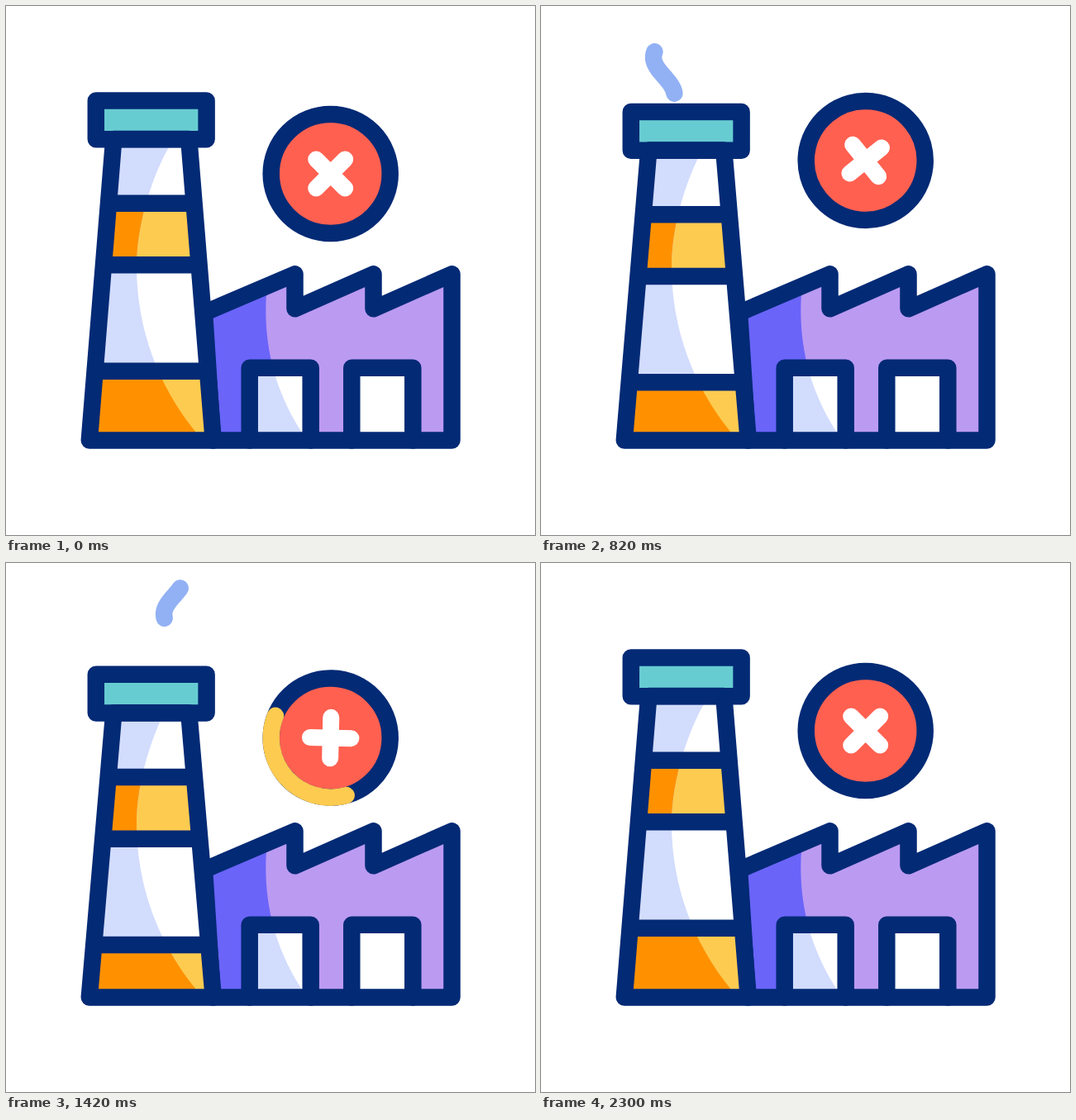
An HTML page for the animation above (2400 ms loop, 640x640 px).

```html
<!DOCTYPE html>
<html lang="en">
<head>
<meta charset="utf-8">
<title>Factory</title>
<style>
  html, body { margin: 0; width: 100%; height: 100%; overflow: hidden; background: #fff; }
  svg { display: block; width: 100vw; height: 100vh; }
  .line { fill: none; stroke: #032a75; stroke-width: 20.5; stroke-linecap: round; stroke-linejoin: round; }
  .smoke { fill: none; stroke: #92b1f4; stroke-width: 20.5; stroke-linecap: round; stroke-linejoin: round; }
</style>
</head>
<body>
<svg viewBox="0 0 640 640">
  <defs>
    <clipPath id="towerClip"><path id="towerShape"/></clipPath>
    <clipPath id="shadeClip">
      <path d="M80 130H219L197 171C180 200 158 260 158 315C158 395 188 465 230 516L238 526H80Z"/>
    </clipPath>
    <clipPath id="hallShade">
      <path d="M230 320H317L315 348C311 410 325 465 358 516L364 526H230Z"/>
    </clipPath>
    <path id="hall" d="M240 371.2L349.5 324.3V366.3L444.5 324.3V366.3L539.5 324.3V525.5H250Z"/>
    <path id="door" d="M294.7 525.5V437.7H368.7V525.5"/>
  </defs>

  <path class="smoke"/>
  <path class="smoke"/>

  <use href="#hall" fill="#bb9af2"/>
  <use href="#hall" fill="#6a64f9" clip-path="url(#hallShade)"/>
  <use href="#door" fill="#fff"/>
  <use href="#door" fill="#d2dcfd" clip-path="url(#hallShade)"/>
  <use href="#door" x="123.6" fill="#fff"/>
  <use href="#hall" class="line"/>
  <use href="#door" class="line"/>
  <use href="#door" x="123.6" class="line"/>

  <g clip-path="url(#towerClip)">
    <g class="lift">
      <path fill="#fff" d="M80 150H270V450H80Z"/>
      <path fill="#fdcb50" d="M80 238.7H270V313.3H80ZM80 441.7H270V540H80Z"/>
    </g>
    <g clip-path="url(#shadeClip)">
      <g class="lift">
        <path fill="#d2dcfd" d="M80 150H270V450H80Z"/>
        <path fill="#ff9100" d="M80 238.7H270V313.3H80ZM80 441.7H270V540H80Z"/>
      </g>
    </g>
  </g>
  <g class="lift">
    <rect class="line" x="108.8" y="114.4" width="133.8" height="46.8" style="fill:#67ccd1"/>
  </g>
  <path id="towerLines" class="line"/>

  <g id="badge">
    <circle class="line" r="72" style="fill:#ff6050"/>
    <path id="arc" fill="none" stroke="#fdcb50" stroke-width="20.5" stroke-linecap="round"/>
    <path d="M-17.5 -17.5L17.5 17.5M17.5 -17.5L-17.5 17.5" stroke="#fff" stroke-width="20" stroke-linecap="round"/>
  </g>
</svg>
<script>
const LOOP = 2400;
const $ = id => document.getElementById(id);
const lifts = document.querySelectorAll('.lift');
const puffs = document.querySelectorAll('.smoke');

// Monotone cubic curve through [time, value] keys; extremes are flat.
function curve(keys) {
  const slope = keys.slice(1).map(([t, v], i) => (v - keys[i][1]) / (t - keys[i][0]));
  const tan = keys.map((_, i) => {
    const a = slope[i - 1] || 0, b = slope[i] || 0;
    return a * b > 0 ? 2 * a * b / (a + b) : 0;
  });
  return t => {
    const i = keys.findIndex(k => t < k[0]) - 1;
    if (i < 0) return keys[keys.length - 1][1];
    const [t0, v0] = keys[i], [t1, v1] = keys[i + 1];
    const d = t1 - t0, u = (t - t0) / d, w = 1 - u;
    return v0 * w * w * (1 + 2 * u) + v1 * u * u * (3 - 2 * u)
      + d * u * w * (tan[i] * w - tan[i + 1] * u);
  };
}

const sink = curve([[0, 0], [340, 47], [820, 13.6], [1620, 21.6], [1960, 0]]);
const bob = curve([[0, 0], [340, 53], [820, -16], [1240, 16.5], [1620, -0.5], [1980, 5.7], [2240, 0]]);
const spin = curve([[0, 0], [340, 48], [820, 185.8], [1240, 388.5], [1620, 614.3], [1980, 782], [2200, 810]]);

const clamp = x => Math.min(1, Math.max(0, x));
const ease = (t, start, length) => (1 - Math.cos(Math.PI * clamp((t - start) / length))) / 2;

function drawTower(s) {
  const top = 161 + s, base = 525.5;
  const inset = y => 29.5 * (base - y) / (base - top);
  const left = y => (100.8 + inset(y)).toFixed(2);
  const right = y => (250.8 - inset(y)).toFixed(2);
  const shape = `M${left(top)} ${top}H${right(top)}L${right(base)} ${base}H${left(base)}Z`;
  const bars = [238.7, 313.3, 441.7].map(y => `M${left(y + s)} ${y + s}H${right(y + s)}`);
  $('towerShape').setAttribute('d', shape);
  $('towerLines').setAttribute('d', shape + bars.join(''));
  lifts.forEach(g => g.setAttribute('transform', `translate(0 ${s})`));
}

// A piece of a sine wave that rises from behind the cap and shrinks at the top.
function drawPuff(path, t, dx) {
  const head = ease(t, 160, 1000), tail = ease(t, 450, 870);
  if (head <= 0 || tail >= 1) return path.setAttribute('d', '');
  const y0 = 160 - 141 * tail, y1 = 160 - 141 * head, n = 30;
  let d = '';
  for (let i = 0; i <= n; i++) {
    const y = y0 + (y1 - y0) * i / n;
    const x = 148.8 + dx - 12.7 * Math.cos(Math.PI * (y - 62) / 46);
    d += (i ? 'L' : 'M') + x.toFixed(2) + ' ' + y.toFixed(2);
  }
  path.setAttribute('d', d);
}

function drawBadge(t) {
  $('badge').setAttribute('transform', `translate(392.7 ${203 + bob(t)}) rotate(${spin(t)})`);
  const from = ease(t, 1275, 804) * 2 * Math.PI;
  const to = ease(t, 1061, 788) * 2 * Math.PI;
  const at = a => `${(72 * Math.sin(a)).toFixed(3)} ${(-72 * Math.cos(a)).toFixed(3)}`;
  const shown = to > 0 && from < 2 * Math.PI;
  const mid = (from + to) / 2;
  $('arc').setAttribute('d', shown ? `M${at(from)}A72 72 0 0 1 ${at(mid)}A72 72 0 0 1 ${at(to)}` : '');
}

const begin = performance.now();
function frame() {
  const t = (performance.now() - begin) % LOOP;
  drawTower(sink(t));
  drawPuff(puffs[0], t, 0);
  drawPuff(puffs[1], t - 445, 55);
  drawBadge(t);
  requestAnimationFrame(frame);
}
frame();
</script>
</body>
</html>
```
